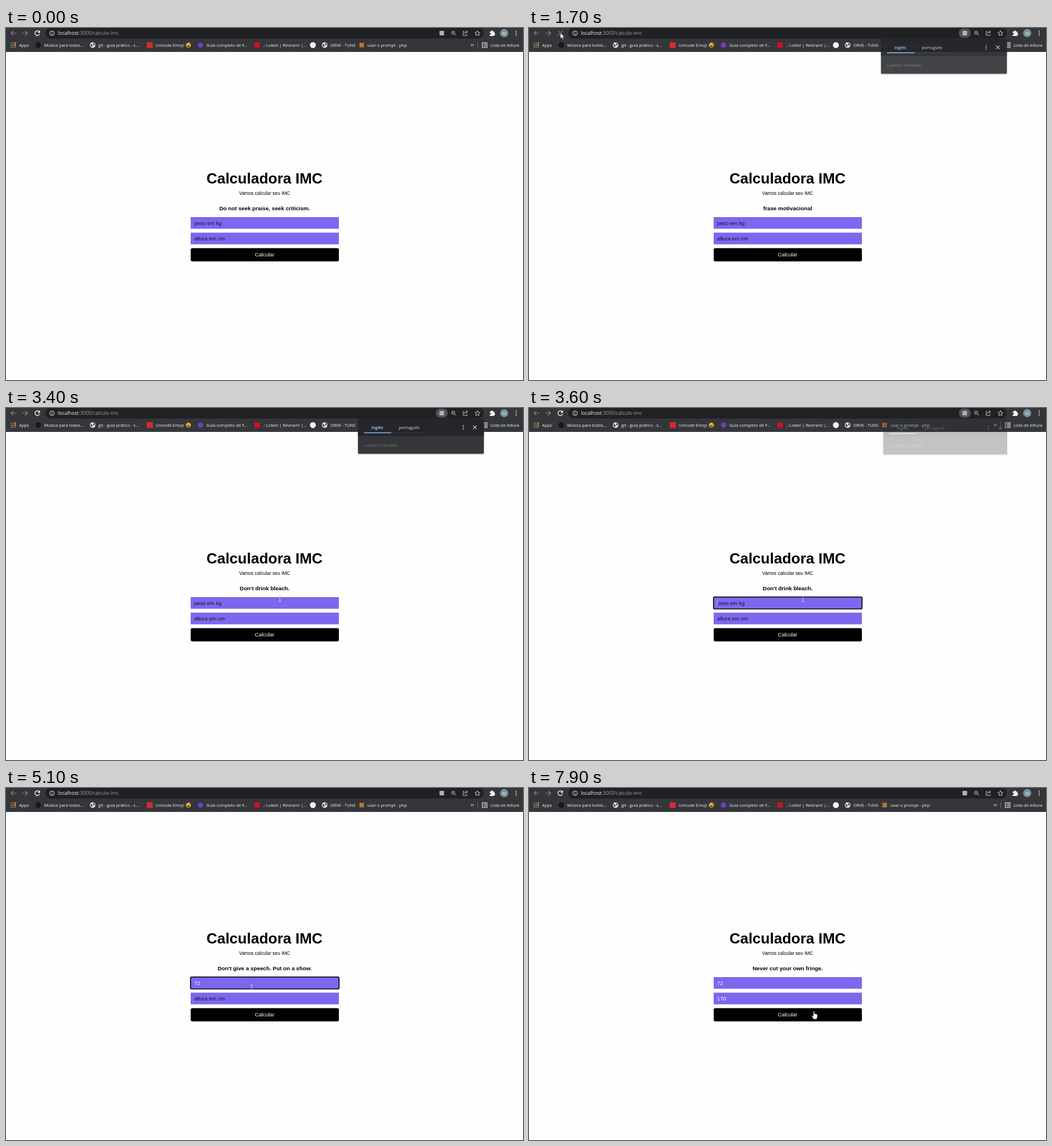
Write an HTML page that moves like this. It is 907 px wide and 618 px high and loops after 8 s.

```html
<!DOCTYPE html>
<html lang="pt">
<head>
<meta charset="utf-8">
<title>Calculadora IMC</title>
<style>
  html, body { margin: 0; width: 100%; height: 100%; overflow: hidden; background: #fefefe; }
  svg { display: block; }
  .ui text { font: 7.4px "Open Sans", "Noto Sans", sans-serif; fill: #f1f3f4; }
  .ui .url { font-size: 8.7px; fill: #9aa0a6; }
  .ui .tab { font-size: 7.1px; font-weight: 700; fill: #9aa0a6; }
  .ui .brand { font: 7.7px Roboto, sans-serif; fill: #6b6e73; }
  .page text { font-family: "Liberation Sans", Arial, sans-serif; font-size: 9.35px; }
  .mid { text-anchor: middle; }
  .line { fill: none; stroke: #e8eaed; stroke-width: 1.2; }
  .ring { fill: none; stroke: #000; stroke-width: 1.6; }
</style>
</head>
<body>
<svg width="907" height="618" viewBox="0 0 907 618">
  <defs>
    <clipPath id="edge"><rect x="600" y="19" width="239" height="70"/></clipPath>
    <g id="globe">
      <circle r="4.8" fill="#f1f3f4"/>
      <path d="M-3.6-2.2Q-.5-1 0 .3T-1 3.6Q-3.4 2-3.8-.2ZM1-3.9Q3.6-2.8 3.9 0L2 1 .6-1.2Z" fill="#45474a"/>
    </g>
  </defs>

  <g class="page">
    <rect width="907" height="618" fill="#fefefe"/>
    <text class="mid" x="453.5" y="273" style="font-size:26px;font-weight:700">Calculadora IMC</text>
    <text class="mid" x="453.7" y="293.4" style="font-size:8.3px">Vamos calcular seu IMC</text>
    <text class="mid" id="phrase" x="453.8" y="320" style="font-size:9.75px;font-weight:700"></text>
    <rect x="324" y="332" width="260" height="20.5" fill="#7b68ee"/>
    <rect x="324" y="359.3" width="260" height="20.5" fill="#7b68ee"/>
    <rect class="ring" id="ring" x="323.7" width="260.6" height="21" rx="2"/>
    <text id="weight" x="330" y="345.5"></text>
    <text id="height" x="330" y="373"></text>
    <rect id="caret" width=".8" height="10.5" fill="#e6e2ff"/>
    <rect x="324" y="386.6" width="260" height="23.2" rx="3"/>
    <text class="mid" x="453.7" y="401.4" fill="#fff">Calcular</text>
  </g>

  <g class="ui">
    <rect width="907" height="42" fill="#35363a"/>
    <rect x="69" y="-1" width="769" height="19.5" rx="9.5" fill="#202124"/>

    <path class="line" d="M18 9H9M13 4.8L8.8 9l4.2 4.2" style="stroke:#85878a"/>
    <path class="line" d="M28.5 9h9M33.5 4.8L37.8 9l-4.3 4.2" style="stroke:#85878a"/>
    <circle id="hover" cx="55" cy="9" r="9" fill="#404145"/>
    <g id="reload">
      <path class="line" d="M58.3 6.6A4.1 4.1 0 1 0 58.9 10.4" style="stroke-width:1.4"/>
      <path d="M59.6 4v4.4h-4.4Z" fill="#f1f3f4"/>
    </g>
    <path id="stop" class="line" d="M51 5l8 8M59 5l-8 8" style="stroke:#77797c"/>

    <g class="line" style="stroke-width:1">
      <circle cx="80.8" cy="9.2" r="4"/>
      <path d="M80.8 8.5v3M80.8 6.5v1"/>
    </g>
    <text class="url" x="91" y="12.3"><tspan fill="#f1f3f4">localhost</tspan>:3000/calculo-imc</text>

    <rect id="chip" x="754" y="1" width="21" height="16" rx="8" fill="#515358"/>
    <rect x="760.5" y="5" width="8" height="8" rx="1" fill="#aeb2b7"/>
    <g class="line" style="stroke:#c4c7cb;stroke-width:1">
      <circle cx="784.5" cy="8.3" r="2.9"/>
      <path d="M786.7 10.5l3 3M783 8.3h3"/>
      <path d="M804 6h-2v7h7v-2M803.8 10.4q.5-3.6 5-3.6M807 4.5l3 2.3-3 2.4"/>
      <path d="M827 4.7l1.3 3 3.2.3-2.4 2.1.7 3.2-2.8-1.7-2.8 1.7.7-3.2L822.500 8l3.200-.3Z"/>
    </g>
    <path d="M848.500 6.300h2.500a1.600 1.600 0 1 1 3 0h2.700v2.500a1.600 1.600 0 1 1 0 3.200v2h-8.200v-2.600a1.500 1.500 0 1 0 0-2.600Z" fill="#f1f3f4"/>
    <circle cx="874" cy="9" r="7.200" fill="#78909c"/>
    <text class="mid" x="874" y="11.800">M</text>
    <g id="menu" fill="#e8eaed"></g>

    <g id="apps"></g>
    <circle cx="56.500" cy="30" r="5" fill="#17181a"/>
    <use href="#globe" x="152" y="30"/>
    <rect x="247" y="25" width="10.500" height="10" fill="#d42a32"/>
    <circle cx="320" cy="30" r="4.300" fill="#fbc02d"/>
    <path d="M317.200 30.500h5.600q-.5 2.800-2.800 2.800t-2.800-2.800Z" fill="#61401b"/>
    <path d="M318.200 27.800v1.500M321.800 27.800v1.500" stroke="#61401b"/>
    <circle cx="341.300" cy="30" r="4.600" fill="#713fc0"/>
    <rect x="436" y="25.500" width="9" height="9" fill="#d5101c"/>
    <circle cx="538.400" cy="30" r="5.200" fill="#f1f3f4"/>
    <use href="#globe" x="559" y="30"/>
    <rect x="620" y="26" width="8" height="8" fill="#b5713a"/>
    <g id="marks"></g>
    <path class="line" d="M815.500 28l2 2-2 2M818.500 28l2 2-2 2" style="stroke-width:1"/>
    <path d="M827.500 24.500v11" stroke="#6b6d71"/>
    <g class="line" style="stroke-width:1">
      <rect x="835.500" y="25.800" width="8.500" height="8.500"/>
      <path d="M837 28h1M839 28h3.500M837 30h1M839 30h3.500M837 32h1M839 32h3.500"/>
    </g>

    <g clip-path="url(#edge)">
      <g id="popup">
        <rect x="617" y="19" width="222" height="63" rx="2" fill="#000" opacity=".2"/>
        <rect x="617.500" y="17" width="220.800" height="63.200" rx="2" fill="#35363a"/>
        <rect x="617.500" y="17" width="220.800" height="32" fill="#25262a"/>
        <path d="M628 43.800h112" stroke="#3c3e43" stroke-width=".8"/>
        <path d="M628 43.500h48" stroke="#8ab4f8" stroke-width="1.500"/>
        <text class="tab" x="641" y="36.500" style="fill:#8ab4f8">inglês</text>
        <text class="tab" x="689" y="36.500">português</text>
        <g id="dots" fill="#bdc1c6"></g>
        <path class="line" d="M819.500 31l6 6M825.500 31l-6 6" style="stroke:#bdc1c6"/>
        <text class="brand" x="628" y="67.800">Lumora Translate</text>
      </g>
    </g>
  </g>

  <g id="arrow"><path d="M0 0v10.200l2.400-2.200 1.700 3.800 1.700-.8-1.700-3.600h3.200Z" fill="#fff" stroke="#222" stroke-width=".7"/></g>
  <g id="beam"><path d="M-2.500-4.700h2l.5.5.500-.5h2M0-4.500v9M-2.500 4.700h2l.5-.5.500.5h2" fill="none" stroke="#cfcbd9"/></g>
  <g id="hand"><path d="M-2.200-6.200q1.200-1 2 .2v4l1.200-.5 1 .8 1.200-.2.700.9 1.100.2v4.200l-1.400 4h-5.400l-3-5q-.8-1.600.7-1.700l1.900 1.500Z" fill="#fff" stroke="#111" stroke-width=".7"/></g>
</svg>

<script>
const LOOP = 8000, STEP = 100;
const $ = id => document.getElementById(id);
const show = (id, on) => $(id).style.display = on ? "" : "none";

const bookmarks = [
  [23, "Apps"], [67, "Música para todos..."], [162, "git - guia prático - s..."],
  [262.5, "Unicode Emoji"], [351.5, "Guia completo de F..."],
  [451, ".: Lotex! | Reviram! |..."], [569, "ORVE - TUNS"],
  [634, "usar o prompt - php"], [850, "Lista de leitura"]
];
$("marks").innerHTML = bookmarks.map(([x, s]) => `<text x="${x}" y="32.700">${s}</text>`).join("");

const kebab = (x, y, gap) =>
  [-gap, 0, gap].map(d => `<circle cx="${x}" cy="${y + d}" r="1"/>`).join("");
$("menu").innerHTML = kebab(895, 9, 3.5);
$("dots").innerHTML = kebab(802, 34, 3.3);

const tints = ["#ea4335", "#ea4335", "#fbbc04", "#34a853", "#4285f4", "#fbbc04", "#34a853", "#4285f4", "#ea4335"];
$("apps").innerHTML = tints.map((c, i) =>
  `<rect x="${8 + i % 3 * 3.5}" y="${25.5 + (i / 3 | 0) * 3.5}" width="2.300" height="2.300" fill="${c}"/>`).join("");

// Each table row takes effect at its time and holds until the next one.
const phrases = [
  [0, "Do not seek praise, seek criticism."], [1500, "frase motivacional"],
  [2300, "Don't drink bleach."], [4700, "Don't give a speech. Put on a show."],
  [6700, "Never cut your own fringe."]
];
const weights = [[0, ""], [4400, "7"], [4600, "72"]];
const heights = [[0, ""], [6400, "1"], [6700, "17"], [6900, "170"]];
const focus = [[0, ""], [3500, "weight"], [5700, "height"], [7900, ""]];
const pointers = [[0, ""], [200, "arrow"], [3400, "beam"], [7600, "arrow"], [7800, "hand"]];
const carets = [3500, 4400, 4600, 5700, 6400, 6700, 6900].map(t => [t, t]);

// Time, x, y
const path = [
  [200, 523, 249], [300, 385, 168], [400, 215, 83], [500, 95, 25], [600, 57, 9],
  [800, 57, 9], [1100, 55, 8.5], [2600, 55, 8.5], [2800, 85, 26], [3100, 320, 205],
  [3300, 468, 322], [3400, 480.5, 335], [4900, 480, 335], [5000, 455, 344],
  [5100, 431, 350.5], [5200, 431, 350.5], [5500, 416, 369], [5700, 415, 370],
  [7300, 415, 370], [7400, 451.5, 367.5], [7500, 451.5, 367.5],
  [7600, 505, 413], [7700, 505, 413], [7800, 501, 398.5]
];
const fade = [
  [1500, 0, 0], [1600, .5, 0], [1700, .93, 0], [1800, 1, 0],
  [3400, 1, 0], [3500, .75, 2], [3600, .29, 4], [3700, 0, 5]
];

const held = (rows, t) => rows.reduce((v, [at, x]) => at <= t ? x : v, rows[0][1]);

function tween(rows, t) {
  const i = rows.findIndex(r => r[0] > t);
  if (i < 0) return rows[rows.length - 1].slice(1);
  if (i === 0) return rows[0].slice(1);
  const a = rows[i - 1], b = rows[i], k = (t - a[0]) / (b[0] - a[0]);
  return [1, 2].map(n => a[n] + (b[n] - a[n]) * k);
}

function field(id, value, hint) {
  $(id).textContent = value || hint;
  $(id).setAttribute("fill", value ? "#fff" : "#171331");
}

function draw(t) {
  const weight = held(weights, t), height = held(heights, t), active = held(focus, t);
  $("phrase").textContent = held(phrases, t);
  field("weight", weight, "peso em kg");
  field("height", height, "altura em cm");

  const top = active === "height" ? 359 : 331.7;
  const typed = active === "height" ? height : weight;
  show("ring", active);
  $("ring").setAttribute("y", top);
  show("caret", active && (t - held(carets, t)) % 1000 < 500);
  $("caret").setAttribute("x", 330 + typed.length * 5.2 + (typed ? .4 : 0));
  $("caret").setAttribute("y", top + 5);

  const loading = t >= 1400 && t < 2400;
  show("hover", t >= 600 && t < 1400);
  show("stop", loading);
  show("reload", !loading);
  show("chip", t >= 1600 && t < 4000);

  const [alpha, shift] = tween(fade, t);
  $("popup").setAttribute("opacity", alpha);
  $("popup").setAttribute("transform", `translate(${shift} ${shift * .35})`);

  const pointer = held(pointers, t), [x, y] = tween(path, t);
  for (const id of ["arrow", "beam", "hand"]) {
    show(id, id === pointer);
    $(id).setAttribute("transform", `translate(${x} ${y})`);
  }
}

const start = performance.now();
function tick() {
  const t = (performance.now() - start) % LOOP;
  draw(Math.floor(t / STEP) * STEP);
  requestAnimationFrame(tick);
}
tick();
</script>
</body>
</html>
```
